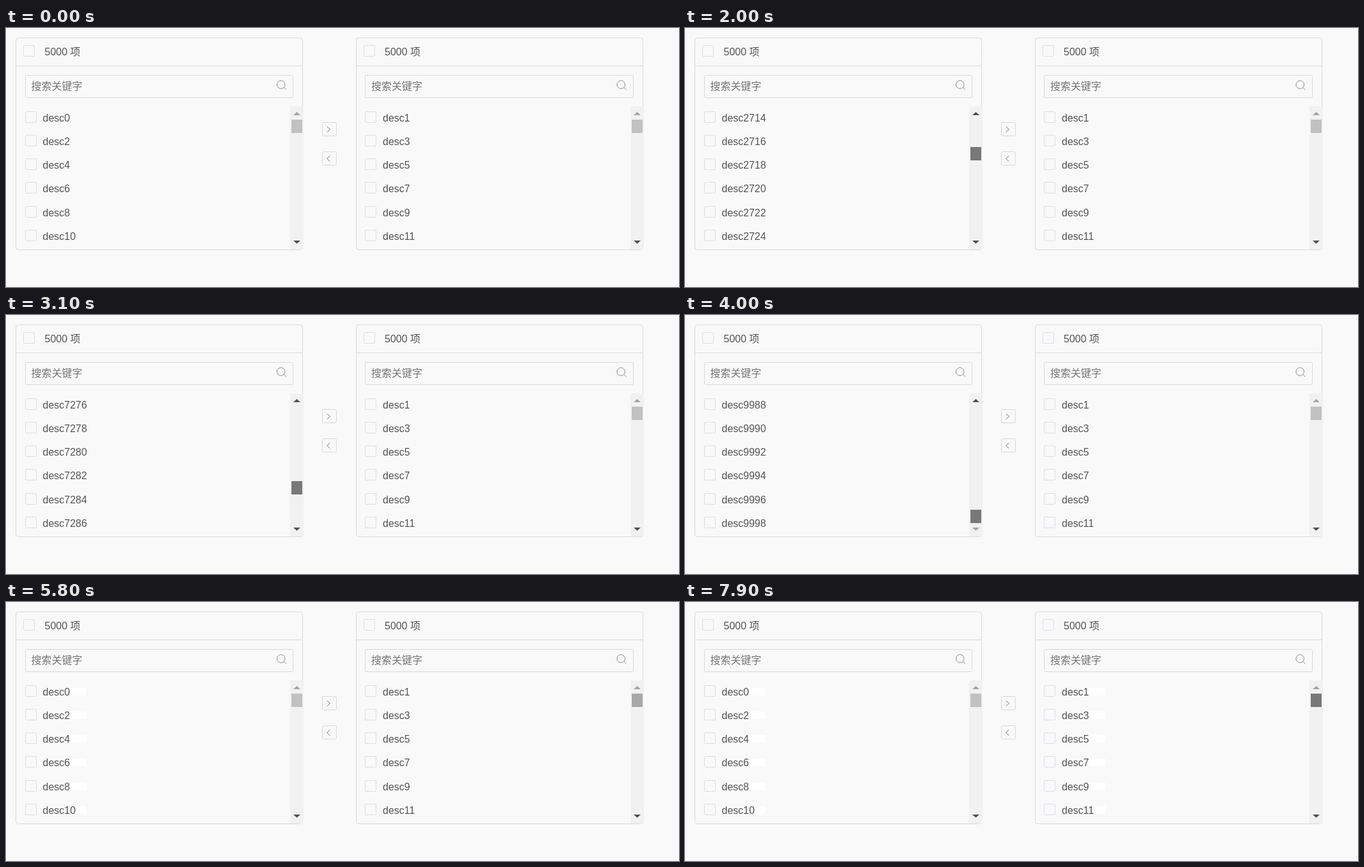
An HTML page for the animation above (8 s loop, 1054 px wide and 407 px high).

```html
<!DOCTYPE html>
<html lang="zh-CN">
<head>
<meta charset="utf-8">
<title>Transfer list</title>
<style>
  html, body { margin: 0; width: 100%; height: 100%; overflow: hidden; background: #f9f9f9; }
  svg { display: block; }
  text { font: 16px "Liberation Sans", Arial, "Noto Sans CJK SC", "Noto Sans CJK", sans-serif; fill: #555; white-space: pre; }
  .hint { fill: #757575; }
  .line { fill: none; stroke: #d9d9d9; }
  .check { fill: none; stroke: #dcdfe6; }
  .icon { fill: none; stroke: #8c8c8c; }
  .track { fill: #f1f1f1; }
  .trail { fill: #fff; }
</style>
</head>
<body>
<svg id="stage" width="1054" height="407" viewBox="0 0 1054 407"></svg>
<script>
const LOOP = 8000, STEP = 100;
const TRAVEL = 162, LAST = 4994;   // thumb range in px, last first-row index
const ROWS = 6;
const stage = document.getElementById('stage');

function add(tag, attrs, text) {
  const el = document.createElementNS('http://www.w3.org/2000/svg', tag);
  for (const k in attrs) el.setAttribute(k, attrs[k]);
  if (text) el.textContent = text;
  return stage.appendChild(el);
}

function frame(x, y, w, h, r, cls = 'line') {
  return add('rect', { x: x + .5, y: y + .5, width: w - 1, height: h - 1, rx: r, class: cls });
}

// Most parts of the second panel sit 532.5px to the right, snapped either way.
function panel(right) {
  const snapUp = right * 533, snapDown = right * 532, mid = right * 532.5;
  frame(15 + snapUp, 15, 450, 334, 4);
  add('path', { d: `M${16 + snapUp} 59.5h448`, class: 'line' });
  frame(27 + snapUp, 27, 18, 18, 1.5, 'check');
  add('text', { x: 60.5 + mid, y: 43 }, '5000 项');

  frame(30 + snapDown, 74, 420 + right, 36, 2);
  add('text', { x: 39.5 + mid, y: 97, class: 'hint' }, '搜索关键字');
  add('circle', { cx: 430.7 + mid, cy: 89, r: 6.3, class: 'icon' });
  add('path', { d: `M${435.2 + mid} 93.5l3.7 3.7`, class: 'icon' });

  const rows = [];
  for (let i = 0; i < ROWS; i++) {
    const dy = Math.floor(37.25 * i);
    frame(30 + snapDown, 131 + dy, 18, 18, 1.5, 'check');
    rows.push({
      trail: add('rect', { y: 135 + dy, height: 12, class: 'trail' }),
      label: add('text', { x: 57.5 + mid, y: 147 + dy })
    });
  }

  const bar = 445 + snapUp;
  add('rect', { x: bar, y: 123, width: 21, height: 225, class: 'track' });
  const up = add('path', { d: `M${bar + 5} 137l5.5 -5l5.5 5z` });
  const down = add('path', { d: `M${bar + 5} 334l5.5 5l5.5 -5z` });
  const thumb = add('rect', { x: bar + 2, width: 17, height: 21 });

  return (pos, color, dragged) => {
    const first = Math.ceil(pos * LAST / TRAVEL);
    rows.forEach(({ label, trail }, i) => {
      const n = String(2 * (first + i) + right);
      const end = 57.5 + 33.8 + 8.9 * n.length;
      label.textContent = 'desc' + n;
      trail.setAttribute('x', end + mid);
      trail.setAttribute('width', dragged ? Math.max(0, 126 - end) : 0);
    });
    const atEnd = pos >= TRAVEL;
    thumb.setAttribute('y', 144 + (atEnd ? TRAVEL : Math.max(0, pos - 1)));
    thumb.setAttribute('fill', color);
    up.setAttribute('fill', pos > 0 ? '#505050' : '#a3a3a3');
    down.setAttribute('fill', atEnd ? '#a3a3a3' : '#505050');
  };
}

function button(y, chevron) {
  frame(495, y, 23, 22, 2);
  add('path', { d: chevron, class: 'icon', style: 'stroke:#777' });
}

// Points are [time, thumb offset], joined by straight runs.
function along(points, t) {
  let [t0, v0] = points[0];
  for (const [t1, v1] of points) {
    if (t < t1) return t <= t0 ? v0 : Math.round(v0 + (v1 - v0) * (t - t0) / (t1 - t0));
    t0 = t1; v0 = v1;
  }
  return v0;
}

const IDLE = '#c1c1c1', HOVER = '#a8a8a8', PRESSED = '#787878';
const sides = [
  {
    draw: panel(0), over: 600, press: 900, leave: 5200,
    drag: [[1000, 0], [2000, 44], [3100, 118], [3700, 150], [4000, 162], [4400, 162], [4900, 0]]
  },
  {
    draw: panel(1), over: 5800, press: 6000, leave: LOOP,
    drag: [[5900, 0], [6800, 128], [7200, 162], [7500, 162], [7900, 0]]
  }
];
button(148, 'M502.8 155l4.7 4.3l-4.7 4.3');
button(194, 'M507.4 201l-4.7 4.3l4.7 4.3');

let shown = -1;
function tick() {
  const t = Math.floor(performance.now() % LOOP / STEP) * STEP;
  if (t !== shown) {
    shown = t;
    for (const s of sides) {
      const color = t < s.over || t >= s.leave ? IDLE : t < s.press ? HOVER : PRESSED;
      s.draw(along(s.drag, t), color, t > s.drag[0][0]);
    }
  }
  requestAnimationFrame(tick);
}
tick();
</script>
</body>
</html>
```
